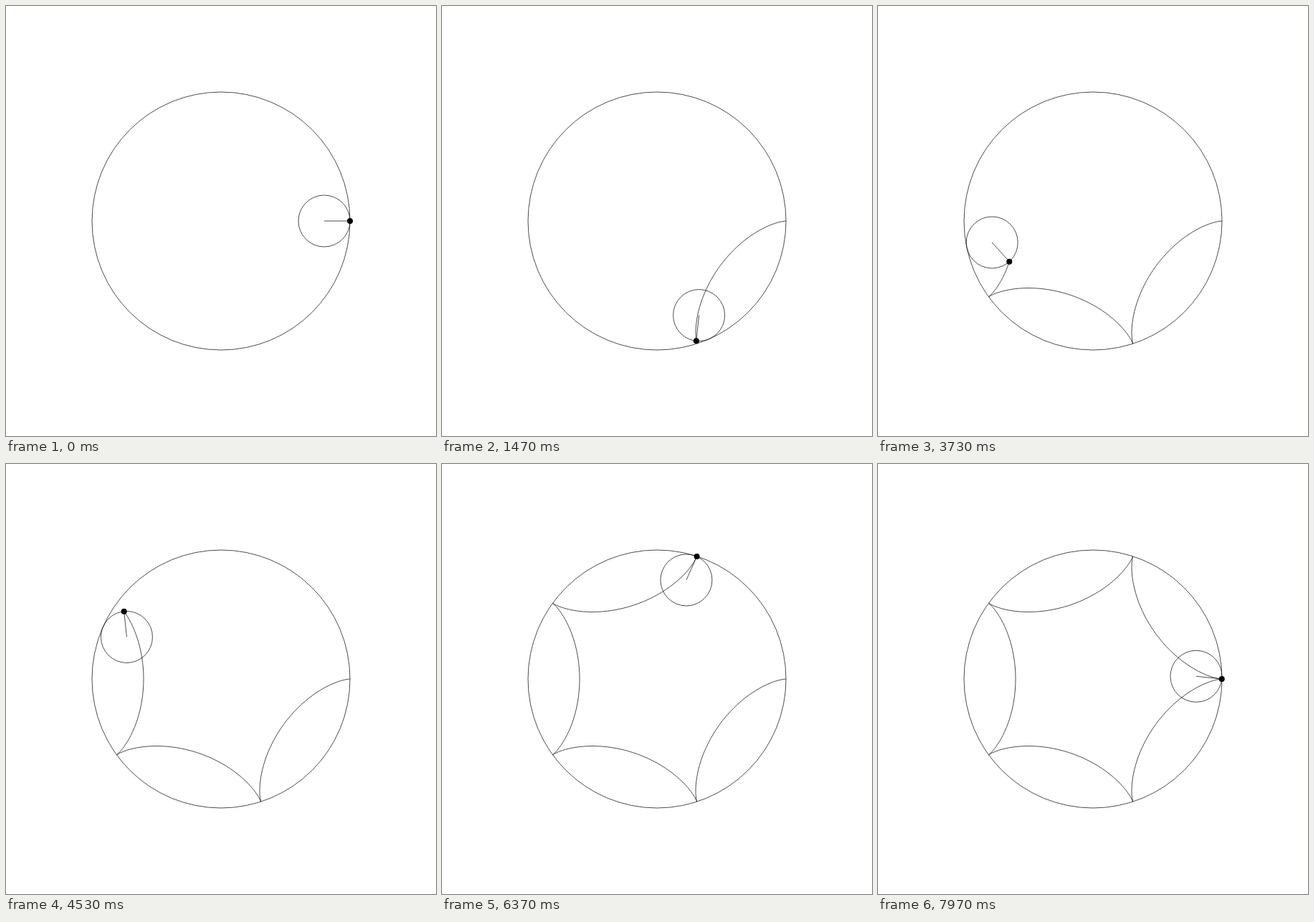
Write an HTML page that moves like this. It is 600 by 600 pixels and loops after 8.01 s.

```html
<!DOCTYPE html>
<html lang="en">
<head>
<meta charset="utf-8">
<title>Hypocycloid</title>
<style>
  html, body { margin: 0; width: 100%; height: 100%; overflow: hidden; background: #fff; }
  svg { display: block; width: 100vw; height: 100vh; }
  .thin { fill: none; stroke: #000; stroke-width: 0.7; }
</style>
</head>
<body>
<svg viewBox="0 0 600 600">
  <g class="thin">
    <circle cx="300" cy="300" r="180"/>
    <path id="trace"/>
    <circle id="wheel" r="36"/>
    <line id="spoke"/>
  </g>
  <circle id="pen" r="4"/>
</svg>
<script>
const CENTER = 300, OUTER = 180, INNER = 36;
const STEPS = 240, LOOP = 8010;
const [trace, wheel, spoke, pen] =
  ['trace', 'wheel', 'spoke', 'pen'].map(id => document.getElementById(id));

const polar = (origin, radius, angle) => ({
  x: origin.x + radius * Math.cos(angle),
  y: origin.y + radius * Math.sin(angle)
});

function pose(step) {
  const angle = step / STEPS * 2 * Math.PI;
  const hub = polar({ x: CENTER, y: CENTER }, OUTER - INNER, angle);
  return { hub, tip: polar(hub, INNER, angle * (1 - OUTER / INNER)) };
}

const points = Array.from({ length: STEPS }, (_, i) => {
  const { tip } = pose(i);
  return `${tip.x.toFixed(3)},${tip.y.toFixed(3)}`;
});

function set(el, attrs) {
  for (const name in attrs) el.setAttribute(name, attrs[name]);
}

// Thirty steps per second, each starting on a multiple of 10 ms.
function stepAt(time) {
  const rest = time % 100;
  const step = Math.floor(time / 100) * 3 + (rest >= 30) + (rest >= 70);
  return Math.min(step, STEPS - 1);
}

function draw(time) {
  const step = stepAt(time % LOOP);
  const { hub, tip } = pose(step);
  set(trace, { d: 'M' + points.slice(0, step + 1).join('L') });
  set(wheel, { cx: hub.x, cy: hub.y });
  set(spoke, { x1: hub.x, y1: hub.y, x2: tip.x, y2: tip.y });
  set(pen, { cx: tip.x, cy: tip.y });
}

function tick() {
  draw(performance.now());
  requestAnimationFrame(tick);
}
tick();
</script>
</body>
</html>
```
